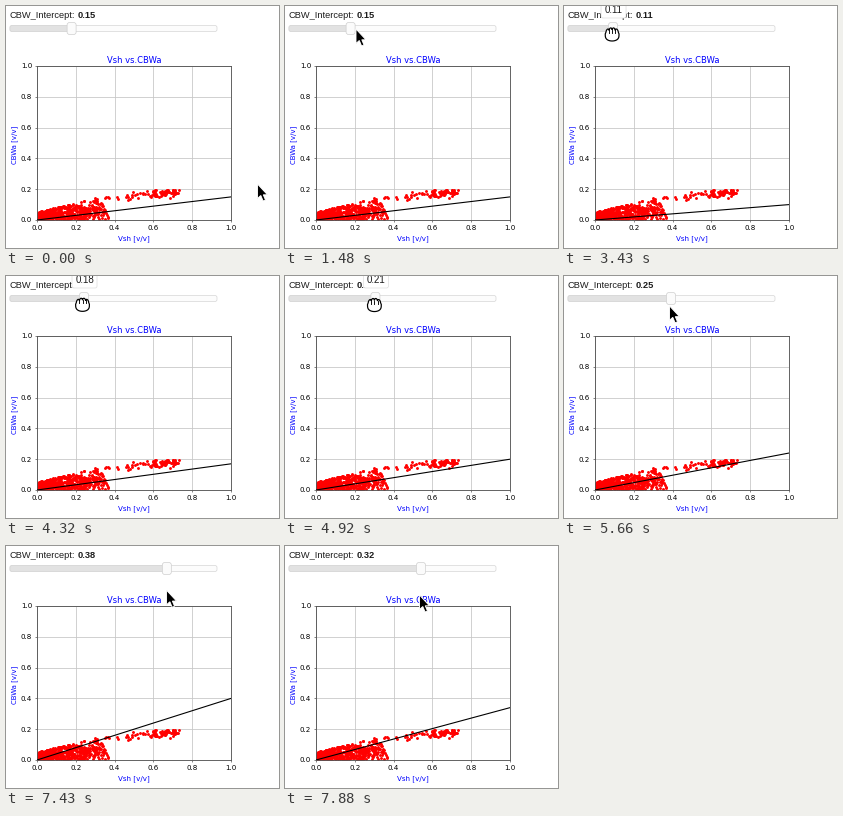
A matplotlib script for the animation above (8 s loop, 273x242 px).

```python
import numpy as np
import matplotlib.pyplot as plt
from matplotlib.animation import FuncAnimation
from matplotlib.patches import FancyBboxPatch, Polygon

W, H, DPI = 273, 242, 64
PX = 72 / DPI            # points per pixel
INTERVAL, FRAMES = 40, 200
STEP = 8000 / 54         # the screen refreshes in these steps
TRACK_X, TRACK_W, V_MAX = 4, 207, 0.5

# the drag, as straight legs between turning points
TURNS = [15, 20, 22, 29, 38, 41, 48, 53]
VALUES = [.15, .10, .10, .18, .25, .25, .425, .32]

APPROACH, GRAB, CLOSE, LEAVE = 3, 11, 14, 34
START, HOVER = np.array([251.5, 177]), np.array([71, 22])

ARROW = np.array([(0, 0), (0, 14.5), (3.3, 11.5), (5.6, 17),
                  (8, 16), (5.8, 10.8), (10, 10.8)]) + [0, 1]


def hand_shape(bump):
    """Four knuckles on an arch, closed by a tapering palm."""
    u = np.linspace(0, 4, 41)
    top = -4.2 + .6 * (u - 2) ** 2 - bump * np.sqrt(np.abs(np.sin(np.pi * u)))
    t = np.linspace(0, np.pi, 21)
    palm = np.column_stack([6.9 * np.cos(t), 7 * np.sin(t) ** .6])
    return np.vstack([np.column_stack([3.1 * (u - 2), top]), palm])


OPEN, FIST = hand_shape(4), hand_shape(2)


def drag(k):
    return float(np.interp(k, TURNS, VALUES))


def shown(k):
    return round(drag(k) + 1e-9, 2)


def handle_x(v):
    return TRACK_X + TRACK_W * v / V_MAX


def pointer_at(k):
    if k < GRAB:
        s = np.clip((k - APPROACH) / (GRAB - 1 - APPROACH), 0, 1)
        return START + (HOVER - START) * s * s * (3 - 2 * s)
    # follows the handle sideways while sinking below the slider
    return np.array([handle_x(drag(k)) - 2, np.interp(k, [15, 23, 41, 53], [23, 28, 29, 48])])


def scatter_points():
    rng = np.random.default_rng(7)
    x = .37 * rng.beta(1.2, 1.6, 480)
    y = np.abs(rng.normal(.03 + .1 * x, .02 + .06 * x))
    y = np.minimum(y, .05 + .3 * x)
    trail = rng.uniform(.3, .57, 24)
    far = rng.uniform(.57, .73, 62)
    far_y = np.clip(rng.normal(.135 + .06 * far, .014), .145, .197)
    return (np.concatenate([x, trail, far]),
            np.concatenate([y, rng.normal(.07 + .18 * trail, .018), far_y]))


fig = plt.figure(figsize=(W / DPI, H / DPI), dpi=DPI, facecolor="white")
plt.rcParams["font.family"] = "DejaVu Sans"

# chart
ax = fig.add_axes([31 / W, 1 - 214 / H, 194 / W, 154 / H])
ax.set(xlim=(0, 1), ylim=(0, 1))
ax.set_axisbelow(True)
ax.grid(color="#c6c6c6", lw=.8 * PX)
ax.tick_params(labelsize=7.1 * PX, length=2.4 * PX, width=.7 * PX, pad=2.4 * PX, color="#555555")
for spine in ax.spines.values():
    spine.set(linewidth=.9 * PX, color="#555555")
ax.scatter(*scatter_points(), s=(2.9 * PX) ** 2, color="red", lw=0, zorder=2)
line, = ax.plot([0, 1], [0, .15], color="black", lw=1.1 * PX, zorder=3)

# everything placed by pixel
ui = fig.add_axes([0, 0, 1, 1], zorder=5)
ui.set(xlim=(0, W), ylim=(H, 0))
ui.axis("off")


def label(x, y, s, size, z=1, **kw):
    return ui.text(x, y, s, fontsize=size * PX, zorder=z, **kw)


def rounded(x, y, w, h, r, fc, ec, z):
    return ui.add_patch(FancyBboxPatch((x, y), w, h, boxstyle=f"round,pad=0,rounding_size={r}",
                                       fc=fc, ec=ec, lw=.7 * PX, zorder=z))


label(128, 57, "Vsh vs.CBWa", 8.4, color="blue", ha="center")
label(128, 234, "Vsh [v/v]", 7.1, color="blue", ha="center")
label(11.6, 138.5, "CBWa [v/v]", 7, color="blue", rotation=90, ha="right", va="center")

UI_FONT = dict(family="Liberation Sans", color="#1c1c1c")
label(3.5, 12, "CBW_Intercept:", 9.25, **UI_FONT)
readout = label(71.5, 12, "", 9.25, weight="bold", **UI_FONT)

rounded(TRACK_X, 19.5, TRACK_W, 6, 2, "#fcfcfc", "#d6d6d6", 2)
fill = rounded(TRACK_X, 19.5, 60, 6, 2, "#e2e2e2", "#d6d6d6", 3)
handle = rounded(0, 16.5, 9, 12, 2.5, "#fbfbfb", "#cfcfcf", 4)
tip_box = rounded(0, -3, 25, 15, 2, "white", "#dddddd", 5)
tip_text = label(0, 7, "", 9.8, 6, ha="center", **UI_FONT)

arrow = ui.add_patch(Polygon(ARROW, fc="black", ec="white", lw=.9 * PX, zorder=8))
hand = ui.add_patch(Polygon(FIST, fc="white", ec="black", lw=1.2 * PX, zorder=8))
creases = [ui.plot([], [], color="black", lw=.9 * PX, zorder=9)[0] for _ in range(3)]


def update(i):
    k = int((i * INTERVAL + 15) / STEP)
    v, pos = shown(k), pointer_at(k)
    x = handle_x(v)
    line.set_ydata([0, shown(k - 1)])   # the chart lags one step behind
    readout.set_text(f"{v:.2f}")
    fill.set_width(x - TRACK_X)
    handle.set_x(x - 5)

    held = GRAB <= k < LEAVE
    for art in (tip_box, tip_text, hand, *creases):
        art.set_visible(held)
    arrow.set_visible(not held)
    tip_box.set_x(x - 12.5)
    tip_text.set(x=x, text=f"{v:.2f}")
    arrow.set_xy(ARROW + pos)
    hand.set_xy((FIST if k >= CLOSE else OPEN) + pos)
    for n, crease in enumerate(creases):
        cx = pos[0] + 3.1 * (n - 1)
        crease.set_data([cx, cx], pos[1] + np.array([-4, -1]))
    return ()


anim = FuncAnimation(fig, update, frames=FRAMES, interval=INTERVAL,
                     init_func=lambda: update(0), repeat=True, repeat_delay=0)
plt.show()
```
